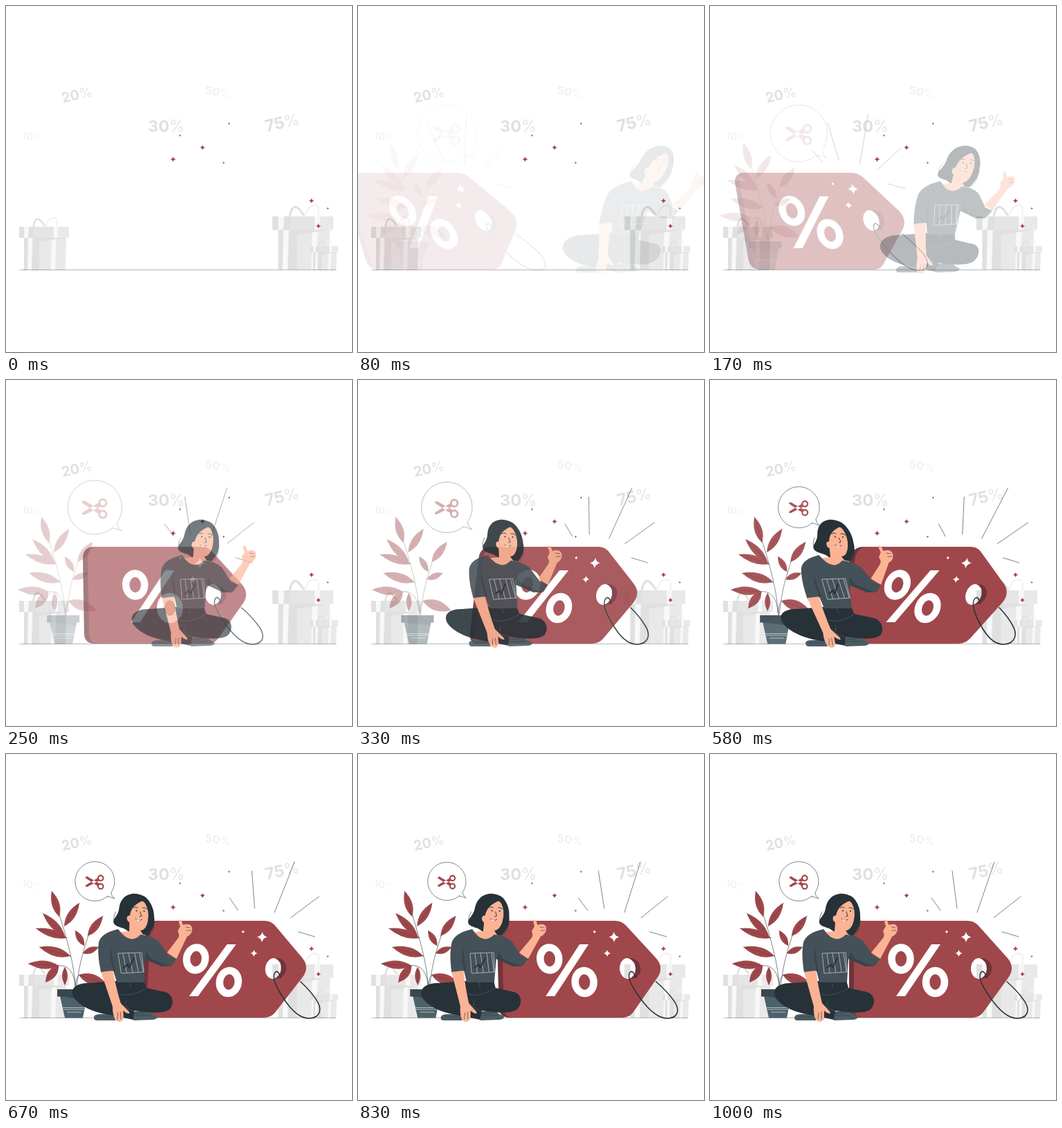
Animation of 500x500 px, one loop 1.04 s. Source, as an HTML page:

```html
<!DOCTYPE html>
<html lang="en">
<head>
<meta charset="utf-8">
<title>Discount</title>
<style>
html, body { margin: 0; width: 100%; height: 100%; overflow: hidden; background: #fff; }
svg { display: block; width: 100vw; height: 100vh; }
text { font: 700 20px Inter, Roboto, sans-serif; fill: #e0e0e0; }
text tspan { font-weight: 300; }
.line { fill: none; stroke: #263238; stroke-width: .6; stroke-linecap: round; stroke-linejoin: round; }
.red { fill: #a0474b; }
.dark { fill: #263238; }
.skin { fill: #fbb394; }
.shirt { fill: #455158; }
.shade { fill: #37444b; }
</style>
</head>
<body>
<svg viewBox="0 0 500 500">
  <defs>
    <g id="gift">
      <path fill="none" stroke="#e0e0e0" stroke-width="2.6" d="M20.500 0C22 -9 25 -12 28 -11S34 -6 37 -1"/>
      <path fill="none" stroke="#f3f3f3" stroke-width="2" d="M38 0C41 -9 46 -14 51 -13S55 -7 54 0"/>
      <path fill="#e9e9e9" d="M7 16H68L67 63H7Z"/>
      <path fill="#e0e0e0" d="M7 16H67L29 22V63H7Z"/>
      <path fill="#f8f8f8" d="M13 16H19.500L18 63H12ZM47 19L53.500 18L52 63H46Z"/>
      <path fill="#e9e9e9" d="M0 0H72V16H0Z"/>
      <path fill="#e0e0e0" d="M0 0H50V16H0Z"/>
      <path fill="#e5e5e5" d="M21 0H50V16H21Z"/>
      <path fill="#f8f8f8" d="M7 0H14L13 16H7ZM50 0H56V16H50Z"/>
    </g>
  </defs>

  <text transform="translate(82 140) rotate(-13)">20<tspan>%</tspan></text>
  <text transform="translate(205 182)" font-size="23.500" style="font-size:23.5px">30<tspan>%</tspan></text>
  <text transform="translate(376.500 182) rotate(-13)" style="font-size:23.5px">75<tspan>%</tspan></text>
  <text transform="translate(287 127) rotate(9)" style="font-size:16.5px;fill:#f1f1f1">50<tspan>%</tspan></text>
  <text transform="translate(22.500 192) rotate(9)" style="font-size:14.5px;fill:#f2f2f2">10<tspan fill-opacity=".7">%</tspan></text>
  <use href="#gift" x="19" y="319"/>
  <use href="#gift" transform="translate(385 304) scale(1.222)"/>
  <use href="#gift" transform="translate(440 347) scale(.556)"/>
  <path class="line" d="M20 381.300H476" stroke-opacity=".6"/>
  <g id="confetti" class="red"></g>

  <g id="tag">
    <path class="line" d="M320 208L333 226M350 169L357 223M386 229L411 156M410 236.500L449 206M422 257L446 264"/>
    <path fill="#70333a" d="M218 241H240V381H216Q201 381 201 366V258Q201 241 218 241Z"/>
    <path class="red" fill-rule="evenodd" d="M224 241H372Q381 241 387 247L430 295Q441 308 432 322L395 373Q389 381 379 381H222Q208 381 208 367V257Q208 241 224 241ZM377 310A11.500 15 0 0 0 400 310A11.500 15 0 0 0 377 310Z"/>
    <path fill="#70333a" d="M390 295C413 293 413 327 390 325Q400 321 400 310T390 295Z"/>
    <g fill="none" stroke="#fff" stroke-width="10.500">
      <ellipse cx="276" cy="296" rx="13.500" ry="16.500"/>
      <ellipse cx="325.500" cy="329.500" rx="13.500" ry="16.500"/>
    </g>
    <path fill="#fff" d="M320 275H333L282 350H269Z"/>
    <g id="glints" fill="#fff"></g>
    <path class="line" style="stroke-width:1.500px" d="M400 323Q396 312 392 315C386 322 395 338 405 352C418 371 432 383 446 382C462 380 462 367 453 355C446 345 438 337 429 329"/>
  </g>

  <g id="plant">
    <path class="line" d="M101 342C98 300 88 268 77 232M102 338C106 300 112 285 119 262M100 336C98 312 88 304 74 306M101 340Q99 318 110 319M93 292L84 289"/>
    <g id="leaves"></g>
    <path fill="#4d616a" d="M78 350H117L111 381.500H85Z"/>
    <path fill="#37474f" d="M74 340H121V350.500H74ZM78 350H117L116 355Z"/>
    <path fill="none" stroke="#dfe4e6" stroke-width=".7" d="M82 366.500H113.500M82.500 369H113M88 373L109 373"/>
  </g>

  <g id="person">
    <path fill="#4c5c64" d="M122 381Q122 376 132 376L153 375V385H125Q122 384 122 381ZM179 372L201 372Q206 376 213 379Q215 383 207 384L179 385Z"/>
    <path class="line" stroke-dasharray="1 1.500" d="M181 375L196 374M182 378L204 378M128 380H150"/>
    <path class="dark" d="M157 328L118 331C101 331 92 337 93 347C94 358 115 372 140 376L179 384L181 371C202 374 225 376 233 368C240 360 238 347 227 344L200 338L197 327Z"/>
    <path fill="none" stroke="#56646b" stroke-width=".6" d="M161 347Q177 352 199 339M180 371Q163 367 171 356M176 330L178 338"/>
    <path class="skin" d="M233 287L246 296L263 264Q271 260 271 253Q271 245 263 246L258 247Q257 240 253 239Q251 241 254 249L250 256Q253 262 250 266Z"/>
    <path class="line" d="M262 250L268 251M263 255L269 255"/>
    <path class="dark" d="M187 202C175 204 169 212 167 223C165 235 157 237 158 244C160 251 172 249 179 257L207 262C211 257 219 248 217 235C218 216 205 200 187 202Z"/>
    <path class="line" d="M162 228Q154 240 163 249M215 241Q219 250 210 261"/>
    <path class="skin" d="M181 239L180 256L160 258Q178 276 201 263L193 250Z"/>
    <path class="shirt" d="M164 253C149 257 139 261 135 272C132 288 134 302 136 316L154 314L158 330H198L200 296L226 306Q238 309 240 304L246 296L235 291L222 271Q210 261 196 261Q180 277 164 253Z"/>
    <path class="shade" d="M152 279Q153 298 157 313L154 314L150 292ZM200 296L203 286L210 296L234 306L224 307Z"/>
    <g fill="none" stroke="#cfd5d8" stroke-width=".7">
      <path d="M162 288L196 287L198 315L165 317ZM169 288L173 316M177 288L182 316M186 288L190 315M193 288L197 315"/>
    </g>
    <path class="line" style="stroke-width:1.800px" d="M169 309L175 304L177 309L184 295"/>
    <path class="skin" d="M136 315L153 313Q157 340 162 360L173 372Q176 377 169 374L165 371L165 382Q161 390 154 385Q149 379 150 365Z"/>
    <path class="line" d="M157 374L156 383M161 373L161 383"/>
    <path class="skin" d="M182 224C180 242 187 254 196 255C206 255 210 238 209 223C207 209 188 207 182 224Z"/>
    <path class="dark" d="M200 204C182 203 172 224 179 249Q181 246 182 234C184 222 192 216 202 212Q209 219 209 234L206 254Q218 248 216 230Q213 207 200 204Z"/>
    <path fill="#fbb394" d="M179 234Q176 237 179 242L183 245V233Z"/>
    <path class="line" style="stroke-width:.9px" d="M188 222Q191 220 194 222M201 222Q204 221 207 224M197 228L199 234L196 235M190 238Q194 243 199 239"/>
    <circle class="dark" cx="192" cy="226.500" r="1.100"/>
    <circle class="dark" cx="203" cy="227" r="1.100"/>
    <path fill="#fff" d="M190.500 238.300Q194 241.500 198 239.300Q193 244 190.500 238.300Z"/>
    <path class="line" d="M180 243V250"/>
  </g>

  <g id="bubble">
    <path class="line" style="fill:#fff" d="M146.800 205.800A28.500 28.500 0 1 1 151.800 200.300Q152 205 157 209Q150 206 146.800 205.800Z"/>
    <g class="red">
      <path d="M114.500 178Q117 176 120 178.500L135 187L132 190.500L116 180ZM114.500 191Q117 193 120 190.500L135 183L132 179.500L116 189Z"/>
      <g fill="none" stroke="#a0474b" stroke-width="2.200">
        <circle cx="136.800" cy="179.300" r="3.700"/>
        <circle cx="136.800" cy="191.300" r="3.700"/>
      </g>
    </g>
  </g>
</svg>
<script>
const $ = id => document.getElementById(id);

const star = ([x, y, r]) => {
  const c = r * .18;
  return `<path transform="translate(${x} ${y})" d="M0 ${-r}Q${c} ${-c} ${r} 0Q${c} ${c} 0 ${r}Q${-c} ${c} ${-r} 0Q${-c} ${-c} 0 ${-r}Z"/>`;
};

// A leaf from base (x, y) to tip (u, v) with width w
const leaf = ([x, y, u, v, w]) => {
  const len = Math.hypot(u - x, v - y);
  const nx = (y - v) / len * w, ny = (u - x) / len * w;
  const mx = x + (u - x) * .45, my = y + (v - y) * .45;
  return `<path class="red" d="M${x} ${y}Q${mx + nx} ${my + ny} ${u} ${v}Q${mx - nx} ${my - ny} ${x} ${y}Z"/>
    <path class="line" stroke-opacity=".5" d="M${x} ${y}L${u} ${v}"/>`;
};

$('confetti').innerHTML = [
  [241.5, 221.5, 4], [284, 204.5, 3.5], [251.5, 187, 1.8], [322.5, 170, 1.8],
  [314.5, 226.5, 1.8], [441.5, 281.5, 3.5], [451.5, 318, 3.5], [465, 292.5, 1.8]
].map(star).join('');

$('glints').innerHTML = [[370, 264.5, 7.5], [359.5, 288, 5], [342, 257, 2.4]].map(star).join('');

$('leaves').innerHTML = [
  [77, 235, 66, 198, 11], [84, 249, 106, 215, 11], [85, 263, 53, 230, 11],
  [88, 266, 43, 252, 11], [93, 292, 48, 279, 13], [76, 306, 32, 303, 12],
  [76, 305, 57, 330, 12], [85, 308, 85, 334, 8], [118, 263, 140, 234, 11],
  [113, 277, 100, 255, 9], [111, 288, 134, 279, 9], [105, 319, 146, 333, 15]
].map(leaf).join('');

// cubic-bezier(.36, -.01, .5, 1.38)
function ease(p) {
  if (p <= 0) return 0;
  if (p >= 1) return 1;
  const curve = (s, a, b) => 3 * (1 - s) ** 2 * s * a + 3 * (1 - s) * s * s * b + s ** 3;
  let lo = 0, hi = 1;
  for (let i = 0; i < 24; i++) {
    const mid = (lo + hi) / 2;
    if (curve(mid, .36, .5) < p) lo = mid; else hi = mid;
  }
  return curve(lo, -.01, 1.38);
}

function place(id, transform, opacity) {
  $(id).setAttribute('transform', transform);
  $(id).setAttribute('opacity', Math.max(0, Math.min(1, opacity)));
}

// Slide in while leaning, then sway upright; dir -1 enters from the left
function rush(id, p, dir, cy) {
  const enter = ease(p / .6);
  let lean = 20 - 30 * enter;
  if (p >= .8) lean = 2 - 2 * ease((p - .8) / .2);
  else if (p >= .6) lean = -10 + 12 * ease((p - .6) / .2);
  const k = Math.tan(-dir * lean * Math.PI / 180);
  place(id, `matrix(1 0 ${k} 1 ${dir * 245 * (1 - enter) - k * cy} 0)`, enter);
}

const LOOP = 1040, FPS = 24;

function draw(now) {
  const step = Math.floor((now % LOOP + 6) * FPS / 1000);
  const p = step < 2 ? 0 : Math.min(1, step / FPS + .017);
  const e = ease(p), zoom = 1.5 - .5 * e;
  rush('tag', p, -1, 267);
  rush('person', p, 1, 290);
  place('plant', `translate(${-20 * (1 - e)} 0)`, e);
  place('bubble', `translate(128.5 184) scale(${zoom}) translate(-128.5 -184)`, e);
}

const start = performance.now();
function tick() {
  draw(performance.now() - start);
  requestAnimationFrame(tick);
}
tick();
</script>
</body>
</html>
```
